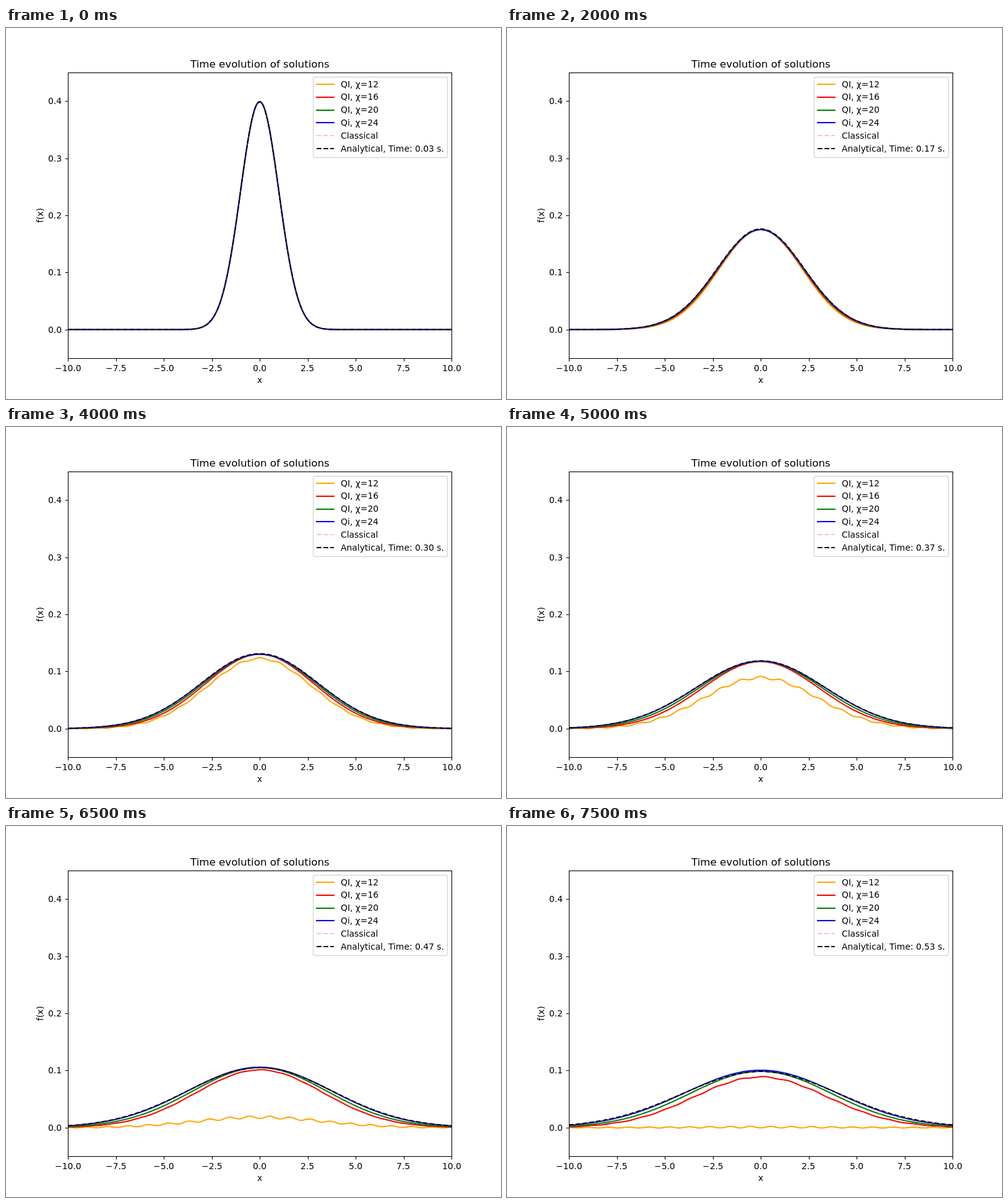
Animation of 800x600 px, one loop 8000 ms. Source, as an HTML page:

```html
<!DOCTYPE html>
<html lang="en">
<head>
<meta charset="utf-8">
<title>Time evolution of solutions</title>
<style>
  html, body { margin: 0; width: 100%; height: 100%; overflow: hidden; background: #fff; }
  svg { display: block; width: 800px; height: 600px; }
  text { font: 13.89px "DejaVu Sans", sans-serif; fill: #000; white-space: pre; }
  .title { font-size: 16.67px; }
  .curve { fill: none; stroke-width: 2.083; stroke-linejoin: round; stroke-linecap: square; }
  .dash { stroke-dasharray: 7.71 3.33; stroke-linecap: butt; }
  .axis { fill: none; stroke: #000; stroke-width: 1.11; }
  .box { fill: #fff; fill-opacity: .8; stroke: #ccc; stroke-opacity: .8; stroke-width: 1.39; }
</style>
</head>
<body>
<svg viewBox="0 0 800 600" xmlns="http://www.w3.org/2000/svg">
  <clipPath id="area"><rect x="100" y="72" width="620" height="462"/></clipPath>
  <g id="curves" clip-path="url(#area)"></g>
  <g id="axes"></g>
  <g id="legend"></g>
</svg>
<script>
const STEP = 500, STEPS = 16;
const px = x => 410 + 31 * x;
const py = v => 487.8 - 924 * v;

// squeeze: step at which the curve has lost much of its width
// fade: how strongly its peak collapses late on
// ripple: waves on top, whose sign turns at step `turn`
const series = [
  { label: 'QI, χ=12', color: 'orange', loss: .25, squeeze: 6, fade: 1,
    ripple: { size: .0022, turn: 11.5, period: 1.06, shift: 0 } },
  { label: 'QI, χ=16', color: 'red', loss: .3, squeeze: 10, fade: .022,
    ripple: { size: .0008, turn: 17, period: 1.3, shift: .2 } },
  { label: 'QI, χ=20', color: 'green', loss: .3, squeeze: 16, fade: 0 },
  { label: 'Qi, χ=24', color: 'blue', loss: .3, squeeze: 20, power: 6, fade: -.004 },
  { label: 'Classical', color: 'pink', exact: true },
  { label: 'Analytical', color: 'black', exact: true }
];

function rippleAt({ size, turn, period, shift }, k) {
  const z = (turn - k) / 2;
  const amp = size * z * Math.exp((1 - z * z) / 2);
  return x => amp * Math.cos(2 * Math.PI * (x - shift) / period) / (1 + x * x / 60);
}

function solution(s, k) {
  let variance = 1 + k * 31 / 30;
  let height = 1 / Math.sqrt(2 * Math.PI * variance);
  if (!s.exact) {
    variance *= 1 - s.loss * (1 - Math.exp(-((k / s.squeeze) ** (s.power || 2))));
    height *= Math.exp(-s.fade * (k / 12) ** 7) * (1 - .007 * Math.sin(Math.PI * k / 13));
  }
  const wave = s.ripple ? rippleAt(s.ripple, k) : () => 0;
  return x => height * Math.exp(-x * x / (2 * variance)) + wave(x);
}

function curvePath(f) {
  const points = Array.from({ length: 401 }, (_, i) => {
    const x = i / 20 - 10;
    return px(x).toFixed(2) + ' ' + py(f(x)).toFixed(2);
  });
  return 'M' + points.join('L');
}

function add(parent, tag, attrs, text) {
  const el = document.createElementNS('http://www.w3.org/2000/svg', tag);
  for (const name in attrs) el.setAttribute(name, attrs[name]);
  if (text) el.textContent = text;
  return parent.appendChild(el);
}

// Places text so that it starts on a whole pixel; align is 0.5 for centred, 1 for right
function addLabel(x, y, text, align, attrs) {
  const el = add(axes, 'text', { y, ...attrs }, text);
  el.setAttribute('x', Math.round(x - align * el.getComputedTextLength()));
}

const [curves, axes, legend] = ['curves', 'axes', 'legend'].map(id => document.getElementById(id));

// Axes, ticks and labels
const snap = v => Math.floor(v + .5) + .5;
for (let x = -10; x <= 10; x += 2.5) {
  add(axes, 'path', { class: 'axis', d: `M${snap(px(x))} 534.5v4.86` });
  addLabel(px(x), 555, x.toFixed(1).replace('-', '−'), .5);
}
for (let v = 0; v < 5; v++) {
  const y = py(v / 10);
  add(axes, 'path', { class: 'axis', d: `M100.5 ${snap(y)}h-4.86` });
  addLabel(90.28, Math.round(y + 5), (v / 10).toFixed(1), 1);
}
add(axes, 'rect', { class: 'axis', x: 100.5, y: 72.5, width: 620, height: 462 });
addLabel(410, 64, 'Time evolution of solutions', .5, { class: 'title' });
addLabel(410, 574, 'x', .5);
addLabel(0, 0, 'f(x)', .5, { transform: 'translate(60 303) rotate(-90)' });

// Curves and legend rows
add(legend, 'rect', { class: 'box', x: 496.5, y: 79.5, width: 217, height: 130, rx: 2.78 });
series.forEach((s, i) => {
  const drop = 20.8 * i;
  const look = { class: s.exact ? 'curve dash' : 'curve', stroke: s.color };
  s.path = add(curves, 'path', look);
  add(legend, 'path', { ...look, d: `M502 ${Math.round(91 + drop)}h27.8` });
  s.text = add(legend, 'text', { x: 541, y: Math.floor(96 + drop) }, s.label);
});
const clock = series[series.length - 1].text;

let shown = -1;
function draw() {
  const k = Math.floor(performance.now() / STEP) % STEPS;
  if (k !== shown) {
    shown = k;
    for (const s of series) s.path.setAttribute('d', curvePath(solution(s, k)));
    clock.textContent = `Analytical, Time: ${((k + 1) / 30).toFixed(2)} s.`;
  }
  requestAnimationFrame(draw);
}
draw();
</script>
</body>
</html>
```
